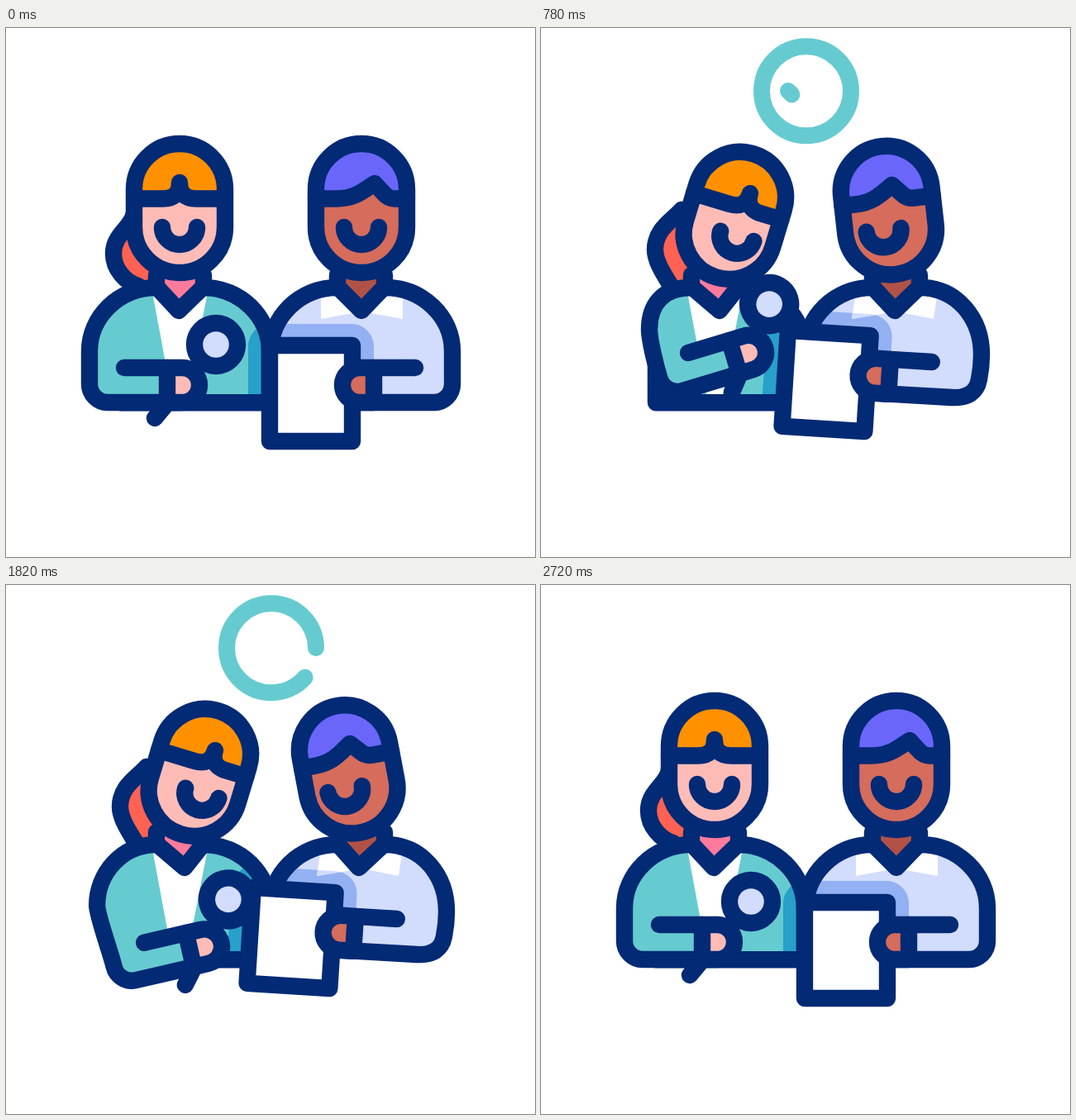
Write an HTML page that moves like this. It is 640 by 640 pixels and loops after 3000 ms.

```html
<!DOCTYPE html>
<html lang="en">
<head>
<meta charset="utf-8">
<title>Review</title>
<style>
  html, body { margin: 0; width: 100%; height: 100%; overflow: hidden; background: #fff; }
  svg { display: block; width: 100vw; height: 100vh; }
</style>
</head>
<body>
<svg id="stage" viewBox="0 0 640 640"></svg>
<script>
const LOOP = 3000;
const NAVY = '#022a75', TEAL = '#66cbd0', PALE = '#d2dcfd', WHITE = '#fff';
const WEIGHT = 20.4;
const stage = document.getElementById('stage');

const lerp = (a, b, k) => a + (b - a) * k;
const mix = (a, b, k) => a.map((v, i) => lerp(v, b[i], k));
const ease = (t, from, to) => {
  const x = Math.min(1, Math.max(0, (t - from) / (to - from)));
  return x * x * (3 - 2 * x);
};

const fill = (d, color) => `<path d="${d}" fill="${color}"/>`;
const line = (d, inside = 'none') =>
  `<path d="${d}" fill="${inside}" stroke="${NAVY}" stroke-width="${WEIGHT}" stroke-linecap="round" stroke-linejoin="round"/>`;
const group = (transform, content) => `<g transform="${transform}">${content}</g>`;
const clip = (id, d) => `<clipPath id="${id}"><path d="${d}"/></clipPath>`;
const clipped = (id, content) => `<g clip-path="url(#${id})">${content}</g>`;

// Moves a limb so that its anchor lands on (x, y), turned by angle degrees.
const limb = (anchor, [x, y, angle]) => ({
  css: `translate(${x} ${y}) rotate(${angle}) translate(${-anchor[0]} ${-anchor[1]})`,
  at(px, py) {
    const r = angle * Math.PI / 180, dx = px - anchor[0], dy = py - anchor[1];
    return [x + dx * Math.cos(r) - dy * Math.sin(r), y + dx * Math.sin(r) + dy * Math.cos(r)];
  }
});

function head(cx, pivotX, angle, strand, slide, hair, skin) {
  const outline = 'M-55 195a55 55 0 0 1 110 0V241a55 55 0 0 1-110 0Z';
  return group(`rotate(${angle} ${pivotX} 305) translate(${cx} 0)`,
    fill(outline, hair) +
    fill(`${strand}V241a55 55 0 0 1-110 0Z`, skin) +
    line(strand) +
    line(`M${slide - 21} 241a21 21 0 0 0 42 0`) +
    line(outline));
}

function neck(left, right, tip, skin) {
  const collar = `M${left} 313L${tip} 342L${right} 313`;
  return fill(`${collar}V285H${left}Z`, skin) +
    line(`${collar}V299M${left} 313V299`);
}

function badge(t) {
  const ring = 2 * Math.PI * 54, tick = 61;
  const trim = (d, length, start, end) => end - start < 0.001 ? '' :
    `<path d="${d}" fill="none" stroke="${TEAL}" stroke-width="20" stroke-linecap="round" stroke-linejoin="round"
      stroke-dasharray="${(end - start) * length} ${length * 2}" stroke-dashoffset="${-start * length}"/>`;
  return trim('M375 76.3a54 54 0 0 1-108 0a54 54 0 0 1 108 0', ring, ease(t, 1720, 2200), ease(t, 220, 700)) +
    trim('M299 76L313.5 90.5L342 62', tick, ease(t, 1250, 1720), ease(t, 690, 1150));
}

function render(t) {
  const enter = ease(t, 220, 780);
  const lower = ease(t, 1230, 1850);
  const home = ease(t, 2200, 2720);
  const lean = enter - ease(t, 2060, 2720);
  const reach = enter - ease(t, 2020, 2600);
  const nod = ease(t, 780, 1280) - ease(t, 1620, 2140);

  // Rest, raised and lowered poses of her arm, blended in turn.
  const pose = (rest, raised, lowered) =>
    mix(mix(mix(rest, raised, enter), lowered, lower), rest, home);
  const herArm = limb([143, 411], pose([143, 411, 0], [178, 393, -16.8], [167, 433, -13]));
  const hisArm = limb([495, 411], mix([495, 411, 0], [472.8, 404, 3.6], reach));

  const shadow = color => group(hisArm.css,
    `<rect x="293" y="358" width="152" height="180" rx="27" fill="${color}"/>`);

  // Man
  const side = mix(
    [505, 314, 540, 350, 540, 391, 540, 404, 540, 418, 540, 431, 540, 443, 530, 453, 518, 453],
    [504, 314, 533, 352, 533, 395, 533, 405, 532, 415, 530, 425, 527, 441, 516, 448, 497, 447], reach);
  const hisBody = `M320 453V391C320 350 355 314 401 314H458C${side}L${hisArm.at(419, 453)}`;
  const dx = -5 * reach;
  const hisCollar = `M381 318L${381 + dx} 352L430 343L${480 + dx} 352L480 318Z`;
  const hisSlide = -8.5 * lean;
  const hisStrand = `M-55 206.5H${hisSlide - 30}C${hisSlide - 8} 206.5 ${hisSlide + 2} 197 ${hisSlide + 16} 188` +
    `L${hisSlide + 26} 199Q${hisSlide + 32} 206.5 ${hisSlide + 40} 206.5H55`;
  const hisTilt = -6.4 * lean - 6.4 * nod;
  const man =
    clip('hisBody', hisBody) + clip('hisCollar', hisCollar) +
    fill(hisBody, PALE) + clipped('hisBody', shadow('#93b1f2')) +
    fill(hisCollar, WHITE) + clipped('hisCollar', shadow(PALE)) +
    line(hisBody) +
    neck(401, 458, 430 + hisTilt * 0.3, '#b25246') +
    head(430, 448, hisTilt, hisStrand, hisSlide, '#6a66fa', '#d56c5c');

  // Woman
  const tail = mix(
    [155, 222, 155, 240, 130, 248, 130, 273, 130, 292, 145, 308, 160, 312],
    [170, 220, 160, 232, 138, 243, 138, 268, 138, 282, 148, 297, 156, 310], lean);
  const tailPath = `M${tail.slice(0, 2)}C${tail.slice(2)}`;
  const torso = 'M139 453V350L160 322L182 314H239C284 314 319 350 319 391V453Z';
  const herSlide = 10 * lean;
  const herStrand = `M-55 206.5H${herSlide - 20}Q${herSlide} 206.5 ${herSlide} 187` +
    `Q${herSlide} 206.5 ${herSlide + 20} 206.5H55`;
  const woman =
    clip('torso', torso) + fill(torso, TEAL) +
    fill('M176 314L202 453H218L245 314Z', WHITE) +
    clipped('torso', shadow('#27a0ca')) +
    line('M139 405V453.3H319V391C319 350 284 314 239 314') +
    neck(182, 239, 209 + 7 * lean, '#ff7b9b') +
    head(210, 192, 16.8 * lean, herStrand, herSlide, '#ff9100', '#ffbcb7');

  const shoulder = pose(
    [136, 314, 101, 350, 101, 391],
    [146, 314, 131, 336, 131, 365],
    [139, 314, 110, 350, 110, 388]);
  const sleeve = `M182 314C${shoulder}C${shoulder[4]} ${shoulder[5] + 12} ` +
    `${herArm.at(101, 415)} ${herArm.at(101, 431)}` +
    `C${herArm.at(101, 443)} ${herArm.at(111, 453)} ${herArm.at(123, 453)}L${herArm.at(195, 453)}`;
  const magnifier = group(herArm.css,
    line('M254 383L180 472') +
    `<circle cx="254" cy="383" r="26" fill="${PALE}" stroke="${NAVY}" stroke-width="${WEIGHT}"/>`);
  const forearm =
    fill(`${sleeve}L${herArm.at(195, 411)}L${herArm.at(150, 411)}L165 330Z`, TEAL) +
    line(sleeve) +
    group(herArm.css,
      line('M195 411H213a21 21 0 0 1 0 42H195Z', '#ffbcb7') + line('M143 411H195'));

  const clipboard = group(hisArm.css,
    line('M319 384H419V500H319Z', WHITE) +
    line('M445 411H428a21 21 0 0 0 0 42H445Z', '#d56c5c') +
    line('M445 411H495'));

  stage.innerHTML = badge(t) +
    fill(`${tailPath}L190 304V240Z`, '#ff6252') + line(tailPath) +
    man + woman + magnifier + forearm + clipboard;
}

const start = performance.now();
function tick() {
  render((performance.now() - start) % LOOP);
  requestAnimationFrame(tick);
}
tick();
</script>
</body>
</html>
```
